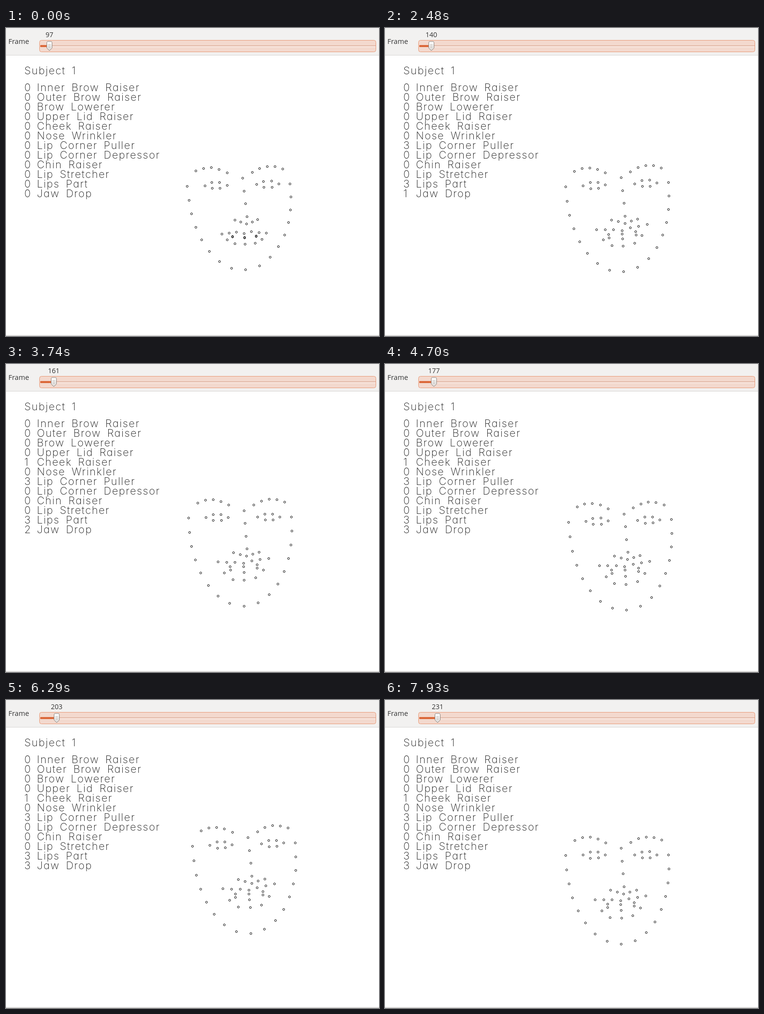
Recreate the animation shown at these times as an HTML page. Size 773x639 px, loop 7990 ms.

```html
<!DOCTYPE html>
<html lang="en">
<head>
<meta charset="utf-8">
<title>Facial landmarks</title>
<style>
html, body { margin: 0; width: 100%; height: 100%; overflow: hidden; background: #fff; }
svg { display: block; width: 773px; height: 639px; }
.ui { font: 14.5px "Open Sans", "Noto Sans", sans-serif; fill: #333; }
.plot { font: 200 21.7px Inter, Lato, sans-serif; font-feature-settings: "cv11"; letter-spacing: 1.62px; word-spacing: 5px; fill: #222; }
#dots { fill: none; stroke: #000; stroke-width: 1; }
</style>
</head>
<body>
<svg viewBox="0 0 773 639">
  <defs>
    <linearGradient id="knobFill" x2="0" y2="1">
      <stop offset="0" stop-color="#fff"/>
      <stop offset="1" stop-color="#dedbd8"/>
    </linearGradient>
  </defs>
  <rect width="773" height="639" fill="#fff"/>
  <rect width="773" height="56" fill="#f2f1f0"/>
  <rect y="56" width="773" height="1" fill="#d8d6d4"/>
  <rect y="637" width="773" height="2" fill="#dcdbda"/>
  <text class="ui" x="5" y="33">Frame</text>
  <rect x="69.5" y="25.5" width="697" height="24" rx="4" fill="#f3d9ce" stroke="#e99a78"/>
  <path d="M71 36.5H766" stroke="#d9a793"/>
  <path d="M71 39.5H766" stroke="#fbeee8"/>
  <rect id="fill" x="71" y="35.5" height="4" rx="1" fill="#d9602f"/>
  <g id="knob">
    <path d="M-5.5 30.5q0-2.5 2.5-2.5h6q2.5 0 2.5 2.5v11l-5.5 5.5-5.5-5.5z" fill="url(#knobFill)" stroke="#8d837c"/>
    <path d="M-2.5 34.5h5m-5 3h5m-5 3h5" stroke="#bdb8b4"/>
    <text id="count" class="ui" y="19" text-anchor="middle" style="font-size:14px"></text>
  </g>
  <text class="plot" x="38" y="96">Subject 1</text>
  <g id="list" class="plot"></g>
  <g id="dots"></g>
</svg>
<script>
const LOOP = 7990, FIRST = 97, LAST_STEP = 134;
const $ = id => document.getElementById(id);

function add(parent, tag, attrs, text = "") {
  const el = document.createElementNS("http://www.w3.org/2000/svg", tag);
  for (const key in attrs) el.setAttribute(key, attrs[key]);
  el.textContent = text;
  return parent.appendChild(el);
}

const mix = (a, b, f) => a + (b - a) * f;
const range = (from, to) => Array.from({ length: to - from + 1 }, (_, i) => from + i);

// Key poses: head position, chin lean, head tilt, smile and jaw drop
const poses = [
  { step: 0, x: 482.5, y: 326, lean: 14.5, tilt: -.022, smile: 0, drop: 0 },
  { step: 25, x: 481, y: 329, lean: 11, tilt: -.019, smile: .5, drop: 0 },
  { step: 43, x: 481, y: 325, lean: 14, tilt: -.042, smile: 1, drop: .55 },
  { step: 64, x: 485, y: 318.5, lean: 8, tilt: -.01, smile: .95, drop: 1 },
  { step: 95, x: 485.5, y: 309, lean: 19, tilt: -.038, smile: 1, drop: 1.25 },
  { step: 118, x: 484.5, y: 325.5, lean: 8, tilt: -.022, smile: 1.4, drop: .85 },
  { step: 134, x: 481, y: 322, lean: 8.5, tilt: -.005, smile: .95, drop: 1.05 }
];

// Nods between the key poses
const nods = [
  { at: 33, width: 6.5, dx: 1.5, dy: 6 },
  { at: 52, width: 7, dx: -.5, dy: 3.5 },
  { at: 82, width: 9, dx: 1.5, dy: 12 },
  { at: 107, width: 8.5, dx: 8, dy: -17 }
];

function poseAt(step) {
  const k = Math.max(1, poses.findIndex(p => p.step >= step));
  const a = poses[k - 1], b = poses[k], pose = {};
  for (const key in a) pose[key] = mix(a[key], b[key], (step - a.step) / (b.step - a.step));
  for (const { at, width, dx, dy } of nods) {
    const weight = Math.exp(-(((step - at) / width) ** 4));
    pose.x += dx * weight;
    pose.y += dy * weight;
  }
  return pose;
}

// Face parts, relative to the middle between the jaw ends

function jaw({ lean, drop }) {
  const height = 175.5 + 8.5 * drop, roll = .0075 * (lean - 6);
  return range(-8, 8).map(k => {
    const x = Math.sign(k) * 106.5 * (1 - (1 - Math.abs(k) / 8) ** 2.4);
    const rise = (Math.hypot(31 * k, 73.7) - 73.7) / 185;
    return [x, height * (1 - rise) - roll * (1 - rise) * x];
  });
}

const brow = side => range(0, 4).map(k => [4 + side * (90 - 16 * k), -37.5 + 2.2 * (k - 1.7) ** 2]);

const eye = side => range(0, 5).map(k => {
  const a = Math.PI * (1 + k / 3), c = Math.cos(a);
  return [6.4 + 53.6 * side + 23 * c * Math.sqrt(Math.abs(c)), 7.2 * Math.sin(a) - .5];
});

function nose({ smile }) {
  const bridge = range(0, 3).map(k => [9.5 + .8 * k, -14 + 26.5 * k]);
  const base = range(-2, 2).map(k => [10 + (11.7 + 1.7 * smile) * k, 80.5 - 4 * Math.abs(k)]);
  return [...bridge, ...base];
}

function mouth({ smile, drop }) {
  const part = Math.min(1, 1.8 * drop);
  const half = 46.3 + 6.4 * smile;
  const top = 101 - 6 * part, bottom = 122.5 + 8 * drop;
  const corner = top - .5 - 6.3 * smile;

  const upper = range(-3, 3).map(k => {
    const n = Math.abs(k);
    return [k / 3, n ? mix(top - 3.6, corner, (n - 1) / 2) : top];
  });
  const lower = [.77, .45, 0, -.45, -.77].map(r => [r, mix(bottom, corner, Math.abs(r) ** 3.2)]);
  const innerUpper = [-1, 0, 1].map(s => [.53 * s, 109 - 6.5 * part - 2.5 * Math.abs(s)]);
  const innerLower = [1, 0, -1].map(s => [.53 * s, s ? 107 : 109.5 + 4.5 * drop]);

  return [...upper, ...lower, ...innerUpper, ...innerLower]
    .map(([r, y]) => [3 + r * half, y - .065 * part * r * half]);
}

function face(pose) {
  const parts = [jaw(pose), brow(-1), brow(1), nose(pose), eye(-1), eye(1), mouth(pose)];
  return parts.flat().map(([x, y]) => [
    pose.x + x + pose.lean * y / 180,
    pose.y + y + pose.tilt * x
  ]);
}

const dots = face(poses[0]).map(() => add($("dots"), "circle", { r: 2 }));

// Action units with their [step, score] changes
const units = [
  ["Inner Brow Raiser"],
  ["Outer Brow Raiser"],
  ["Brow Lowerer"],
  ["Upper Lid Raiser"],
  ["Cheek Raiser", [51, 1]],
  ["Nose Wrinkler"],
  ["Lip Corner Puller", [20, 1], [31, 2], [35, 3], [107, 4], [130, 3]],
  ["Lip Corner Depressor"],
  ["Chin Raiser"],
  ["Lip Stretcher"],
  ["Lips Part", [31, 1], [34, 2], [38, 3]],
  ["Jaw Drop", [41, 1], [51, 2], [79, 3]]
].map(([name, ...changes], i) => {
  const y = 130.5 + 20 * i;
  const score = add($("list"), "text", { x: 38, y }, "0");
  add($("list"), "text", { x: 64, y }, name);
  return { score, changes };
});

// Playback starts slightly faster than it goes on
function stepAt(t) {
  const step = t < 820 ? t / 54.7 : 15 + (t - 820) / 59.75;
  return Math.min(LAST_STEP, Math.floor(step + .4));
}

function draw(t) {
  const step = stepAt(t);

  const x = 90 + step * .142;
  $("count").textContent = FIRST + step;
  $("knob").setAttribute("transform", `translate(${x.toFixed(1)} 0)`);
  $("fill").setAttribute("width", x - 75);

  for (const { score, changes } of units) {
    const last = changes.filter(c => c[0] <= step).pop();
    score.textContent = last ? last[1] : 0;
  }

  face(poseAt(step)).forEach(([cx, cy], i) => {
    dots[i].setAttribute("cx", Math.floor(cx) + .5);
    dots[i].setAttribute("cy", Math.floor(cy) + .5);
  });
}

const start = performance.now();
function tick() {
  draw((performance.now() - start) % LOOP);
  requestAnimationFrame(tick);
}
tick();
</script>
</body>
</html>
```
